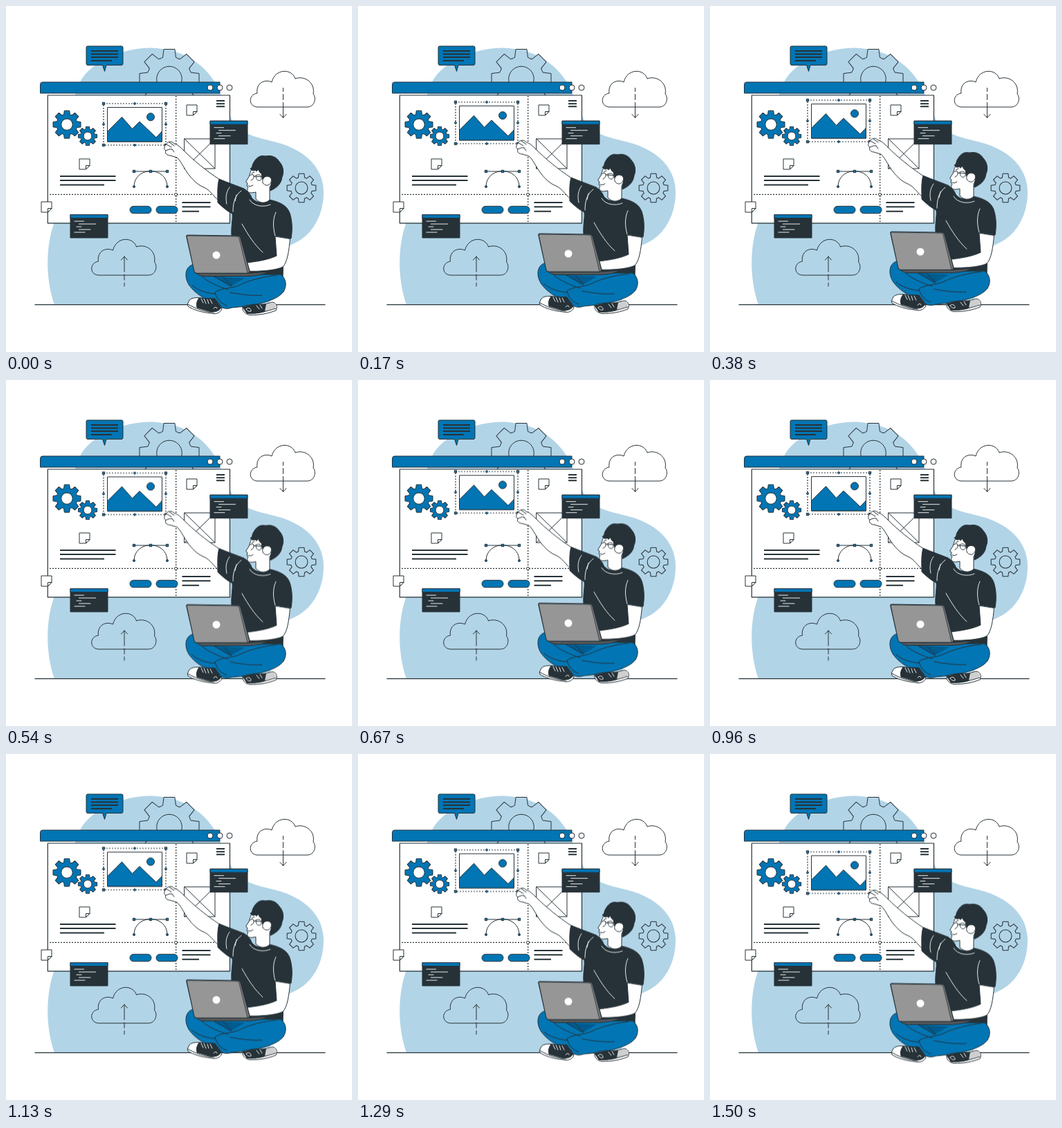
Recreate the animation shown at these times as an HTML page without scripts. Size 500x500 px, loop 1.54 s.

```html
<!DOCTYPE html>
<html lang="en">
<head>
<meta charset="utf-8">
<title>Web design illustration</title>
<style>
  html, body { margin: 0; width: 100%; height: 100%; overflow: hidden; background: #fff; }
  svg { display: block; width: 100%; height: 100%; }
  svg { --ink: #263238; --blue: #0275b4; --sky: #b2d4e7; }
  .line { fill: none; stroke: var(--ink); stroke-linecap: round; stroke-linejoin: round; }
  .paper { fill: #fff; stroke: var(--ink); stroke-linejoin: round; }
  .blue { fill: var(--blue); stroke: var(--ink); stroke-linejoin: round; }
  .sky { fill: var(--sky); stroke: var(--ink); }
  .dark { fill: var(--ink); stroke: var(--ink); stroke-linejoin: round; }
  .fold { fill: none; stroke: #fff; stroke-linecap: round; stroke-width: .9; }
  .text { fill: none; stroke: var(--ink); stroke-width: 2; }
  .dots { fill: none; stroke: var(--ink); stroke-width: 1.2; stroke-dasharray: 2 2; }
  .knob { fill: var(--blue); stroke: var(--ink); }
  .float { animation: float 1540ms infinite; }
  /* 18 held poses up, 18 down, then one at rest */
  @keyframes float {
    0% { transform: translateY(0); animation-timing-function: steps(18, end); }
    48.649% { transform: translateY(-9.8px); animation-timing-function: steps(18, end); }
    97.297%, 100% { transform: translateY(.4px); }
  }
</style>
</head>
<body>
<svg viewBox="0 0 500 500">
  <defs>
    <path id="tooth" d="M-5.74-13.86-4.4-14.5-3.7-20H3.7L4.4-14.5 5.74-13.86"/>
    <g id="teeth">
      <use href="#tooth"/>
      <use href="#tooth" transform="rotate(90)"/>
      <use href="#tooth" transform="rotate(180)"/>
      <use href="#tooth" transform="rotate(270)"/>
    </g>
    <g id="gear">
      <circle r="14.9" stroke="none"/>
      <use href="#teeth"/>
      <use href="#teeth" transform="rotate(45)"/>
    </g>
    <path id="cloud" d="M10 51C-3 50-3 33 10 31C8 17 20 10 31 15C36-5 60-5 65 10C79 5 94 16 91 32C96 38 93 51 82 51Z"/>
    <path id="arrow" class="line" d="M-4.5 5 0 0 4.5 5M0 0V22M0 26V34M0 38V43"/>
    <g id="note" class="paper">
      <path d="M0 0H15V9.5L9.5 15H0Z"/>
      <path d="M9.5 15V9.5H15Z"/>
    </g>
    <g id="code">
      <path class="dark" d="M0 0H54V33.5H0Z"/>
      <path class="blue" d="M0 0H54V5H0Z"/>
      <path class="fold" d="M6 9.5H19.5M12.5 13.5H36.5M9 17.5H16M12.5 21.5H29M6 25.5H21"/>
    </g>
    <path id="square" class="knob" d="M-1.7-1.7H1.7V1.7H-1.7Z"/>
    <use id="diamond" href="#square" transform="rotate(45) scale(.8)"/>
  </defs>

  <path fill="var(--sky)" d="M70 432C56 390 58 345 70 312C108 260 70 190 107 110C122 80 170 60 210 60.5C254 62 285 82 303 112C318 140 321 168 344 182C360 191 382 194 398 199C438 212 459 238 459 269C459 308 437 342 398 349L380 432Z"/>
  <g transform="translate(236 105.5) scale(2.15)" stroke-width=".46">
    <use href="#gear" class="sky"/>
    <circle class="sky" r="8.5"/>
  </g>
  <g transform="translate(427 263) scale(1.04)">
    <use href="#gear" class="sky"/>
    <circle class="sky" r="8.6"/>
  </g>

  <use href="#cloud" class="paper" x="353" y="95"/>
  <use href="#arrow" transform="translate(400.5 161.5) rotate(180)"/>
  <use href="#cloud" class="sky" x="123.5" y="338"/>
  <use href="#arrow" transform="translate(171 362)"/>
  <path class="line" stroke-width="1.2" d="M42 431.7H461"/>

  <g>
    <path class="blue" d="M118 58H167Q169 58 169 60V83Q169 85.5 167 85.5H145L142.5 94.5 139.5 85.5H118Q116 85.5 116 83V60Q116 58 118 58Z"/>
    <path class="text" d="M123 65H162M123 69.5H162M123 74H162M123 79H153"/>
  </g>

  <!-- browser window -->
  <path class="blue" d="M53 110H309V126H49.5V113.5Q49.5 110 53 110Z"/>
  <g class="paper">
    <circle cx="295" cy="118" r="4"/>
    <circle cx="309" cy="118" r="4"/>
    <circle cx="323" cy="118" r="4"/>
    <path stroke-width="1.2" d="M60.3 129H323.5V313.8H60.3Z"/>
  </g>
  <path class="dots" d="M245.7 130V313M63 272.4H323"/>
  <circle class="paper" cx="245.5" cy="272.4" r="2"/>

  <g transform="translate(88 171.2)">
    <use href="#gear" class="blue"/>
    <circle class="paper" r="8.2"/>
  </g>
  <g transform="translate(118 188) scale(.68)" stroke-width="1.4">
    <use href="#gear" class="blue"/>
    <circle class="paper" r="8.7"/>
  </g>

  <use href="#note" x="261" y="143"/>
  <use href="#note" x="106" y="221"/>
  <use href="#note" x="51" y="283"/>
  <path class="text" d="M304 137H316M304 141.2H316M304 145.3H316M78 246H158.5M78 252H158.5M78 258.5H142M254.5 284H295.5M254.5 290.3H295.5M254.5 296.7H279"/>
  <g class="blue">
    <rect x="179" y="289.3" width="31" height="10.4" rx="5.2"/>
    <rect x="217" y="289.3" width="31" height="10.4" rx="5.2"/>
  </g>
  <path class="line" d="M185 239H233M185 261C185 231 233 231 233 261"/>
  <use href="#square" x="185" y="239"/>
  <use href="#square" x="209" y="239"/>
  <use href="#square" x="233" y="239"/>
  <circle class="knob" cx="185" cy="261" r="1.5"/>
  <circle class="knob" cx="233" cy="261" r="1.5"/>
  <path class="line" d="M258 192H302V235H258ZL302 235M302 192 258 235"/>
  <use href="#code" x="295" y="166.2"/>
  <use href="#code" x="93" y="301.5"/>

  <!-- selected picture -->
  <g class="float">
    <path class="dots" d="M141 141H231V201H141Z"/>
    <use href="#square" x="141" y="141"/>
    <use href="#square" x="231" y="141"/>
    <use href="#square" x="141" y="201"/>
    <use href="#square" x="231" y="201"/>
    <use href="#diamond" transform="translate(186 141)"/>
    <use href="#diamond" transform="translate(186 201)"/>
    <use href="#diamond" transform="translate(141 171)"/>
    <use href="#diamond" transform="translate(231 171)"/>
    <path class="paper" d="M146.5 146.5H225.5V196H146.5Z"/>
    <path class="blue" d="M146.5 196V181.5L167.5 160.5 182.5 177.5 193 167 217 190 225.5 181V196Z"/>
    <circle class="blue" cx="209" cy="160.3" r="5.5"/>
  </g>

  <!-- designer -->
  <g class="float">
    <path class="paper" d="M309 251C289 238 270 222 258 210C252 204 248 200 243 199C240 195 235 195 231 200C228 204 228 208 231 209C229 213 233 216 237 216L247 219C252 223 256 232 262 241C270 252 278 259 286 262C295 266 300 275 307 281Z"/>
    <path class="line" d="M231 200C234 200 236 203 239 204M231 209C234 208 236 206 240 207M236 197 243 202M240 207 243 211"/>

    <!-- head -->
    <path class="paper" d="M356 233C353 240 352 244 351 247L346.5 254 349 256 348 260 350 262C347 267 350 270 355 270L361 269V279C367 286 378 286 381 281V262L390 245Z"/>
    <path class="dark" d="M353 235C357 233 355 230 358 226C362 218 369 215 375 217C383 215 391 218 395 225C401 231 402 241 399 247C398 257 391 263 382 267C381 262 386 252 383 249C380 245 374 248 371 251L369 242C366 241 366 238 364 236C363 239 362 240 360 237C358 239 355 238 353 235Z"/>
    <path class="paper" d="M371 251C373 245 380 245 383 249C385 254 381 260 376 259C372 258 370 255 371 251Z"/>
    <path class="line" d="M352 245Q357 242 358 245 359 250 354 252M358 246 371 247M361 245C366 242 370 245 369 250C367 254 361 253 361 245M350 260Q354 262 357 259M355 242 359 240"/>

    <!-- shirt -->
    <path class="dark" d="M308 250C320 255 334 260 344 264C350 268 354 273 355 277C362 286 376 286 381 280C395 283 406 288 410 299C414 311 414 324 412 336L389 332C389 346 400 346 401 353L400 394H330L326 332C325 318 328 308 327 300C320 297 311 289 306 284C306 272 305 260 308 250Z"/>
    <path class="fold" d="M352 280C358 290 373 291 382 287M323 262C318 269 317 277 319 286M340 267C332 273 328 282 328 297M341 315C350 331 359 345 371 356M390 298C385 308 386 322 389 332M333 273 331 282"/>

    <!-- legs -->
    <path class="blue" d="M272 373C258 376 257 392 265 404C274 416 286 423 302 429C311 437 318 439 326 436L346 434C364 431 391 426 401 413C407 403 404 393 397 388L350 388 300 387Z"/>
    <path fill="#005b8f" d="M300 391 325 405 345 393Z"/>
    <path class="line" d="M302 414C309 407 326 409 338 403C352 396 373 391 391 389M302 414C305 424 309 429 319 433M283 391C293 400 309 406 321 410M269 404C279 412 291 415 302 416M324 414C340 417 355 419 370 418M301 391 325 405M314 392 326 404"/>

    <!-- shoes -->
    <path class="paper" d="M264 427C266 421 276 421 282 422L301 423C306 428 310 432 312 438C309 444 303 446 296 444C284 443 270 439 263 434Q261 431 264 427Z"/>
    <path class="dark" d="M279 422 302 423 311 436C307 442 300 443 293 441L276 436Q274 428 279 422Z"/>
    <path class="line" d="M263 431C273 437 287 442 300 443"/>
    <path class="fold" d="M282 423 285 429M286 423 289 430M291 424 293 430M295 424 298 430M300 437Q304 433 305 437"/>
    <path class="paper" d="M342 435C345 431 360 432 370 432L385 428C391 429 393 435 390 440C380 444 367 447 352 446.5C345 445 341 440 342 435Z"/>
    <path class="dark" d="M342 435 358 431 376 431 375 441C367 444 356 445 348 444Z"/>
    <path fill="#cfcfcf" d="M376 431 386 429Q392 433 389 437L374 441Z"/>
    <path class="line" d="M348 444C363 445 377 441 390 437"/>
    <path class="fold" d="M362 433 366 438M367 432 370 437M347 438C350 434 355 438 354 441C351 442 349 441 347 438"/>

    <!-- laptop and forearm -->
    <path class="paper" d="M389 333 391 361C378 367 364 369 348 371L345 383C367 384 390 382 400 377C407 370 409 352 410.5 336.5Z"/>
    <path fill="#55595b" stroke="var(--ink)" d="M275 386H355L378 384Q372 389 350 390.5H285Q279 390 275 386Z"/>
    <path fill="#777" stroke="var(--ink)" stroke-width="1.2" stroke-linejoin="round" d="M263 331 335 332Q338 332 339 335L352 383Q352 386 349 386.500H276Q273 386 272 383L261 334Q260 331 263 331Z"/>
    <path fill="#969696" stroke="var(--ink)" stroke-width=".7" d="M263 332 333 333Q336 333 337 336L349 386H276Q273 386 272 383L261.5 334Q261 332 263 332Z"/>
    <circle cx="304" cy="360" r="5.5" fill="#fff"/>
  </g>
</svg>
</body>
</html>
```
